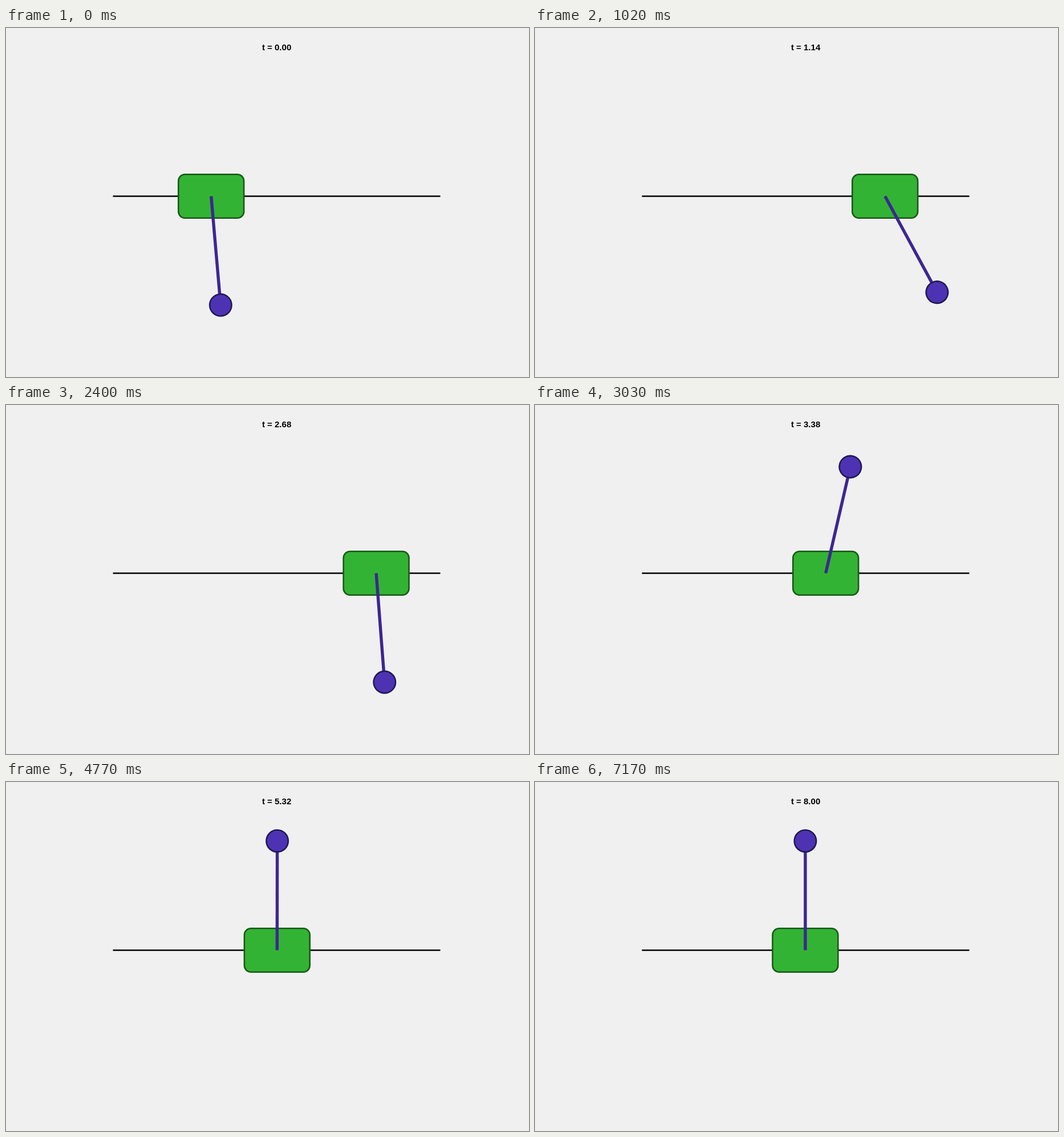
An HTML page for the animation above (7200 ms loop, 917 by 611 pixels).

```html
<!DOCTYPE html>
<html lang="en">
<head>
<meta charset="utf-8">
<title>Cart and pendulum swing-up</title>
<style>
  html, body { margin: 0; width: 100%; height: 100%; overflow: hidden; background: #f0f0f0; }
  svg { display: block; }
  text { font: bold 15px "Liberation Sans", Arial, sans-serif; text-anchor: middle; }
</style>
</head>
<body>
<svg width="917" height="611" viewBox="0 0 917 611">
  <text id="clock" x="474.6" y="39"></text>
  <path d="M187.5 294.5H761.5" stroke="#000" stroke-width="2.5"/>
  <g id="cart">
    <rect x="-57.4" y="256.2" width="114.8" height="76.6" rx="11.5"
          fill="#33b333" stroke="#195919" stroke-width="2.6"/>
    <g id="pendulum">
      <path d="M0 294.5V485.8" stroke="#3d2693" stroke-width="5.4"/>
      <circle cy="485.8" r="19.2" fill="#4d33b3" stroke="#211855" stroke-width="2.6"/>
    </g>
  </g>
</svg>
<script>
const STEP = 30, FRAMES = 240, DURATION = 8;
const CENTER = 474.5, RAIL_Y = 294.5, UNIT = 191.3;

// Turning points [step, value]: cart position in pendulum lengths, angle from hanging in radians
const cartTurns = [[0, -.6], [36, .738], [50, .47], [72, 1.184], [96, .099], [110.5, .419]];
const angleTurns = [[0, .087], [20, -.6], [39, .708], [63, -1.334], [108, 3.178], [135, 3.126], [165, Math.PI]];
const REST = -.003, SETTLE = 24.1;

// Half a sine wave from each turning point to the next
function swing(turns, step) {
  const next = turns.findIndex(([at]) => at > step);
  if (next < 0) return turns.at(-1)[1];
  const [from, a] = turns[next - 1], [to, b] = turns[next];
  return a + (b - a) * (1 - Math.cos(Math.PI * (step - from) / (to - from))) / 2;
}

// The cart swings, then settles from its last turning point
function cartPosition(step) {
  const [last, peak] = cartTurns.at(-1);
  if (step < last) return swing(cartTurns, step);
  return REST + (peak - REST) * Math.exp(-(((step - last) / SETTLE) ** 2));
}

const [clock, cart, pendulum] = ["clock", "cart", "pendulum"].map(id => document.getElementById(id));
const start = performance.now();

function draw() {
  const step = Math.floor(Math.max(0, performance.now() - start) / STEP) % FRAMES;
  const degrees = -swing(angleTurns, step) * 180 / Math.PI;
  clock.textContent = "t = " + (step * DURATION / (FRAMES - 1)).toFixed(2);
  cart.setAttribute("transform", `translate(${CENTER + UNIT * cartPosition(step)} 0)`);
  pendulum.setAttribute("transform", `rotate(${degrees} 0 ${RAIL_Y})`);
  requestAnimationFrame(draw);
}
draw();
</script>
</body>
</html>
```
